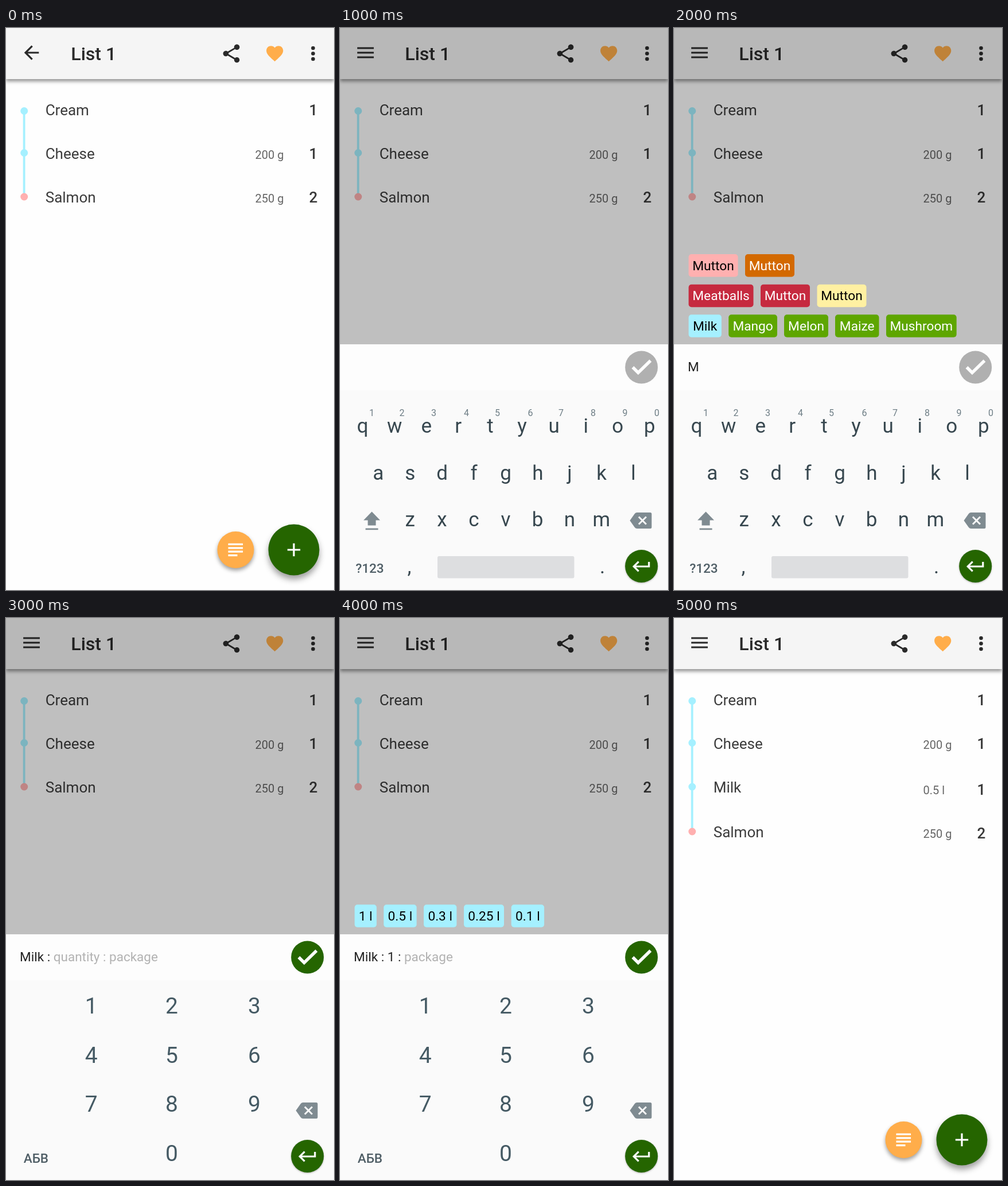
Animation, 572 px wide and 979 px high, one loop 6 s. Source, as an HTML page with a canvas:

```html
<!DOCTYPE html>
<html lang="en">
<head>
<meta charset="utf-8">
<title>Shopping list</title>
<style>
  html, body { margin: 0; width: 100%; height: 100%; overflow: hidden; background: #fff; }
  canvas { display: block; }
</style>
</head>
<body>
<canvas id="stage" width="572" height="979"></canvas>
<script>
const ctx = document.getElementById('stage').getContext('2d');
const STEP = 1000, STEPS = 6;
const CYAN = '#a5f0ff', PINK = '#ffb0b0', AMBER = '#ffad4a', GREEN = '#256500';
const RED = '#c62a3f', ORANGE = '#d36900', YELLOW = '#fff0a2', LEAF = '#5ea600';
const INK = '#2a2a2a', KEY_INK = '#37474f', PAD_INK = '#455a64', KEY_GREY = '#7f8b91';

// Icons are drawn on a 24 unit grid.
const ICONS = {
  back: 'M20 11H7.83l5.59-5.59L12 4l-8 8 8 8 1.41-1.41L7.83 13H20z',
  menu: 'M3 18h18v-2H3zM3 13h18v-2H3zM3 6v2h18V6z',
  share: 'M18 16.08c-.76 0-1.44.3-1.96.77L8.91 12.7c.05-.23.09-.46.09-.7s-.04-.47-.09-.7l7.05-4.11c.54.5 1.25.81 2.04.81 1.66 0 3-1.34 3-3s-1.34-3-3-3-3 1.34-3 3c0 .24.04.47.09.7L8.04 9.81C7.5 9.31 6.79 9 6 9c-1.66 0-3 1.34-3 3s1.34 3 3 3c.79 0 1.5-.31 2.04-.81l7.12 4.16c-.05.21-.08.43-.08.65 0 1.61 1.31 2.92 2.92 2.92s2.92-1.31 2.92-2.92-1.31-2.92-2.92-2.92z',
  heart: 'M12 21.35l-1.45-1.32C5.4 15.36 2 12.28 2 8.5 2 5.42 4.42 3 7.5 3c1.74 0 3.41.81 4.5 2.09C13.09 3.81 14.76 3 16.5 3 19.58 3 22 5.42 22 8.5c0 3.78-3.4 6.86-8.55 11.54z',
  lines: 'M14 17H4v2h10zM20 9H4v2h16zM4 15h16v-2H4zM4 5v2h16V5z',
  plus: 'M19 13h-6v6h-2v-6H5v-2h6V5h2v6h6z',
  enter: 'M19 7v4H5.83l3.58-3.59L8 6l-6 6 6 6 1.41-1.41L5.83 13H21V7z'
};
for (const name in ICONS) ICONS[name] = new Path2D(ICONS[name]);

function icon(name, x, y, color, scale = 1.6) {
  ctx.save();
  ctx.translate(x - 12 * scale, y - 12 * scale);
  ctx.scale(scale, scale);
  ctx.fillStyle = color;
  ctx.fill(ICONS[name]);
  ctx.restore();
}

function text(str, x, y, size, color, { weight = 400, align = 'left' } = {}) {
  ctx.font = `${weight} ${size}px Roboto, sans-serif`;
  ctx.textAlign = align;
  ctx.fillStyle = color;
  ctx.fillText(str, x, y);
  return x + ctx.measureText(str).width;
}

function rect(x, y, w, h, color, radius = 0) {
  ctx.fillStyle = color;
  ctx.beginPath();
  ctx.roundRect(x, y, w, h, radius);
  ctx.fill();
}

function circle(x, y, r, color) {
  ctx.fillStyle = color;
  ctx.beginPath();
  ctx.arc(x, y, r, 0, 2 * Math.PI);
  ctx.fill();
}

function stroke(path, color, width) {
  ctx.strokeStyle = color;
  ctx.lineWidth = width;
  ctx.stroke(new Path2D(path));
}

function shadowed(draw, offset, blur, alpha) {
  ctx.save();
  ctx.shadowColor = `rgba(0,0,0,${alpha})`;
  ctx.shadowOffsetY = offset;
  ctx.shadowBlur = blur;
  draw();
  ctx.restore();
}

function header(navIcon) {
  shadowed(() => rect(0, 0, 572, 89, '#f5f5f5'), 4, 6, .42);
  icon(navIcon, 44.5, 43, INK);
  text('List 1', 113.3, 55.5, 32, INK, { weight: 500 });
  icon('share', 393, 44.5, INK);
  icon('heart', 468.7, 44.5, AMBER, 1.46);
  for (const y of [35, 44.5, 54]) circle(535.5, y, 3.3, INK);
}

// Each row: name, package, quantity, dot y, name baseline, quantity baseline.
const CREAM = ['Cream', '', 1, 144.5, 151.5, 151.5];
const CHEESE = ['Cheese', '200 g', 1, 217.5, 227.5, 228];
const MILK = ['Milk', '0.5 l', 1, 294, 304, 307.5];
const BEFORE = [CREAM, CHEESE, ['Salmon', '250 g', 2, 294, 304, 304]];
const AFTER = [CREAM, CHEESE, MILK, ['Salmon', '250 g', 2, 372, 381.5, 383.5]];

function list(rows) {
  const last = rows.length - 1;
  rect(29.7, 144, 3.8, rows[last][3] - 144, CYAN);
  rows.forEach(([name, pack, count, dotY, nameY, countY], i) => {
    circle(31.7, dotY, 6.5, i === last ? PINK : CYAN);
    text(name, 68.7, nameY, 26, '#3c3c3c');
    text(pack, 434.5, countY - .5, 20, '#646464');
    text(count, 536, countY, 26, '#383838', { weight: 500, align: 'center' });
  });
}

function floatingButtons() {
  shadowed(() => circle(400.5, 909, 32, AMBER), 4, 7, .38);
  icon('lines', 400.3, 909, '#fff');
  shadowed(() => circle(502, 909, 44.5, GREEN), 7, 11, .38);
  icon('plus', 502, 909, '#fff');
}

function chips(y, items) {
  for (const [label, x, width, color] of items) {
    const dark = [RED, ORANGE, LEAF].includes(color);
    rect(x, y, width, 39.5, color, 5);
    text(label, x + width / 2, y + 27.5, 22.7, dark ? '#fff' : '#000', { align: 'center' });
  }
}

function productChips() {
  chips(394, [['Mutton', 25.5, 86, PINK], ['Mutton', 124, 86, ORANGE]]);
  chips(446.7, [['Meatballs', 25.5, 113, RED], ['Mutton', 151, 86, RED], ['Mutton', 249.5, 86, YELLOW]]);
  chips(499.2, [['Milk', 25.5, 57.3, CYAN], ['Mango', 95.2, 84.8, LEAF], ['Melon', 192, 77, LEAF],
    ['Maize', 281, 76.5, LEAF], ['Mushroom', 370, 122.7, LEAF]]);
}

function packageChips() {
  chips(499.2, [['1 l', 25.5, 38.3, CYAN], ['0.5 l', 76.2, 57.4, CYAN], ['0.3 l', 146, 57.4, CYAN],
    ['0.25 l', 216, 70, CYAN], ['0.1 l', 298.7, 57.4, CYAN]]);
}

function inputPanel(typed, hint, ready) {
  rect(0, 551, 572, 428, '#fafafa');
  rect(0, 551, 572, 80, '#fdfdfd');
  const end = text(typed, 24.1, 598, 22.5, '#212121');
  text(hint, end, 598, 22.5, '#b2b2b2');
  circle(525.7, 591, 28.5, ready ? GREEN : '#b0b0b0');
  stroke('M510.5 591L520 600.5 541.5 579.5', '#fff', 5.5);

  ctx.fillStyle = KEY_GREY;
  ctx.fill(new Path2D('M505.5 858l8.5-12q1.5-2 4-2h23q2.5 0 2.5 2.5v23q0 2.5-2.5 2.5h-23q-2.5 0-4-2z'));
  stroke('M521 851.5l13 13M534 851.5l-13 13', '#fafafa', 3);
  shadowed(() => circle(525.7, 937.5, 28.5, GREEN), 1, 3, .3);
  icon('enter', 526, 938, '#fff');
}

function letterKeys() {
  const row = (letters, x, y) => [...letters].forEach((letter, i) =>
    text(letter, x + 55.6 * i, y, 35, KEY_INK, { align: 'center' }));
  row('qwertyuiop', 39.5, 705);
  row('asdfghjkl', 66.8, 786.5);
  row('zxcvbnm', 122.3, 868);
  [55.5, 108, 163.5, 220.5, 274.5, 332, 385.5, 441.5, 497, 552.5].forEach((x, i) =>
    text((i + 1) % 10, x, 676, 16, '#6d7d85', { align: 'center' }));

  ctx.fillStyle = KEY_GREY;
  ctx.fill(new Path2D('M55.5 842.5L70 857.5H62.5V866.5H48.5V857.5H41zM44.5 871.5h22v2.8h-22z'));
  text('?123', 27.3, 949, 22.5, '#4f5e66', { weight: 500 });
  text(',', 121, 950, 35, KEY_INK, { align: 'center' });
  text('.', 457.5, 950, 35, KEY_INK, { align: 'center' });
  rect(170, 920, 238.5, 38.5, '#dddee0', 3);
}

function numberKeys() {
  [...'1234567890'].forEach((digit, i) => {
    const column = digit === '0' ? 1 : i % 3;
    text(digit, [148.7, 289, 433][column], 689 + 85.6 * Math.floor(i / 3), 39, PAD_INK, { align: 'center' });
  });
  text('АБВ', 30.7, 949, 22.5, '#4f5e66', { weight: 500 });
}

function listScreen(navIcon, rows) {
  list(rows);
  header(navIcon);
  floatingButtons();
}

function entryScreen(typed, hint, drawKeys, drawChips) {
  list(BEFORE);
  header('menu');
  rect(0, 0, 572, 551, 'rgba(0,0,0,.25)');
  if (drawChips) drawChips();
  inputPanel(typed, hint, drawKeys === numberKeys);
  drawKeys();
}

const SCREENS = [
  () => listScreen('back', BEFORE),
  () => entryScreen('', '', letterKeys),
  () => entryScreen('M', '', letterKeys, productChips),
  () => entryScreen('Milk : ', 'quantity : package', numberKeys),
  () => entryScreen('Milk : 1 : ', 'package', numberKeys, packageChips),
  () => listScreen('menu', AFTER)
];

function render() {
  rect(0, 0, 572, 979, '#fefefe');
  SCREENS[Math.floor(performance.now() / STEP) % STEPS]();
  requestAnimationFrame(render);
}
render();
</script>
</body>
</html>
```
